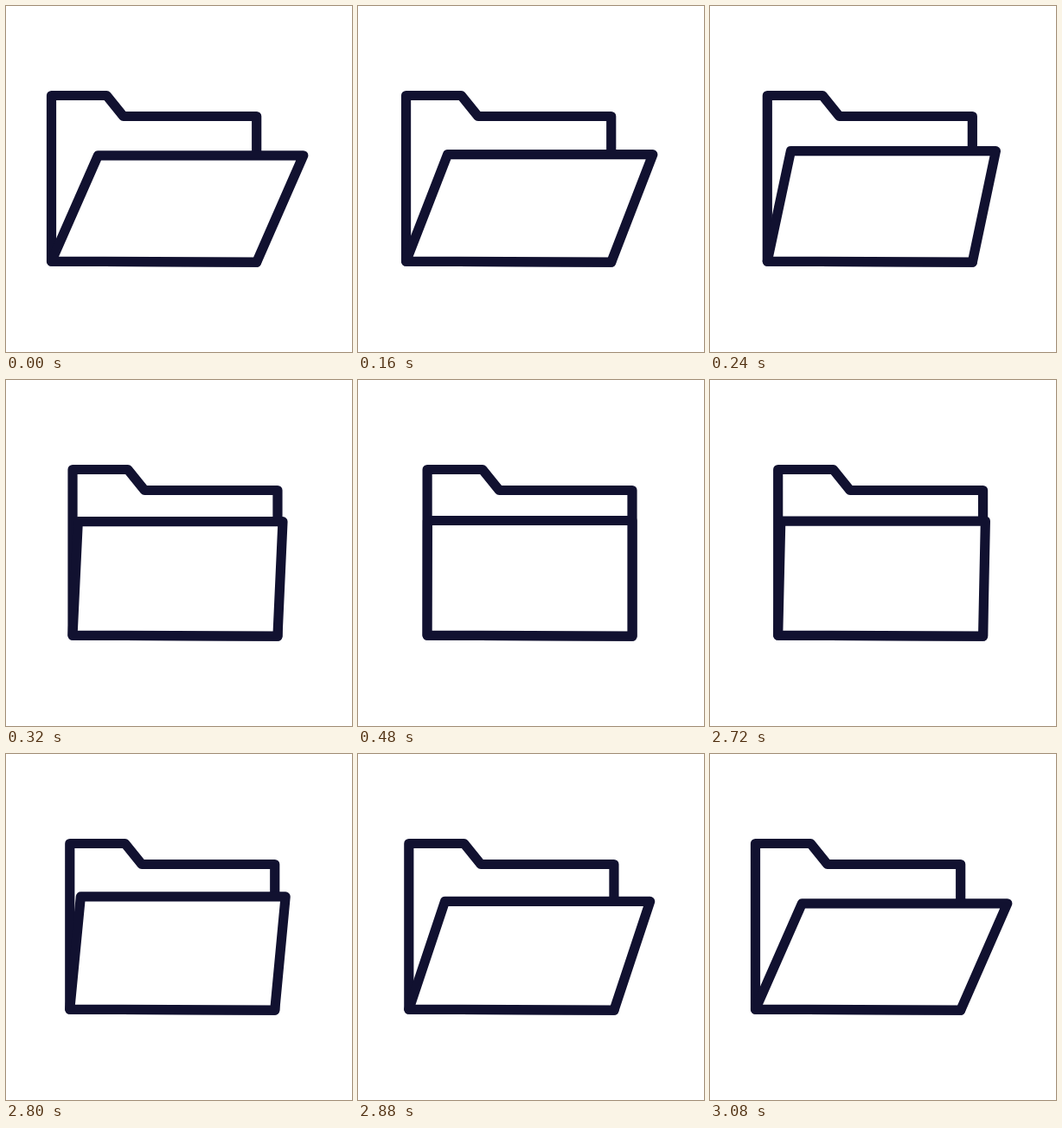
Animation of 400x400 px, one loop 4120 ms. Source, as an HTML page with a canvas:

```html
<!DOCTYPE html>
<html lang="en">
<head>
<meta charset="utf-8">
<title>Folder</title>
<style>
html, body { margin: 0; width: 100%; height: 100%; overflow: hidden; background: #fff; }
canvas { display: block; width: 100vw; height: 100vh; }
</style>
</head>
<body>
<canvas id="stage" width="400" height="400"></canvas>
<script>
const ctx = document.getElementById('stage').getContext('2d');
const LOOP = 4120, STEP = 40, MOVE = 480, REOPEN = 2600;
const INK = '#111130';

const mix = (a, b, p) => a + (b - a) * p;
const clamp = v => Math.min(1, Math.max(0, v));

// Symmetric cubic bezier ease: (0.77, 0) to (0.23, 1)
function ease(x) {
  let lo = 0, hi = 1;
  for (let i = 0; i < 24; i++) {
    const s = (lo + hi) / 2, r = 1 - s;
    if (3 * r * r * s * 0.77 + 3 * r * s * s * 0.23 + s * s * s < x) lo = s;
    else hi = s;
  }
  return lo * lo * (3 - 2 * lo);
}

function closedAmount(t) {
  return t < REOPEN ? ease(clamp(t / MOVE)) : 1 - ease(clamp((t - REOPEN) / MOVE));
}

function shape(points) {
  ctx.beginPath();
  points.forEach(([x, y]) => ctx.lineTo(x, y));
  ctx.closePath();
  ctx.fill();
  ctx.stroke();
}

function draw(t) {
  const p = closedAmount(t);
  const left = mix(52.5, 80.1, p), right = mix(289.7, 317, p);
  const top = mix(172.8, 162.5, p);
  const base = [[right, 296.2], [left, 295.2]];

  ctx.fillStyle = '#fff';
  ctx.fillRect(0, 0, 400, 400);
  ctx.strokeStyle = INK;
  ctx.lineWidth = 11.2;
  ctx.lineJoin = 'round';

  shape([[left, 103.5], [left + 63.8, 103.5], [left + 83.2, 127.5],
         [right, 127.5], ...base]);
  shape([[mix(106.4, 80.4, p), top], [mix(343.8, 317, p), top], ...base]);
}

function tick() {
  const t = performance.now() % LOOP;
  draw(Math.floor(t / STEP) * STEP);
  requestAnimationFrame(tick);
}
tick();
</script>
</body>
</html>
```
